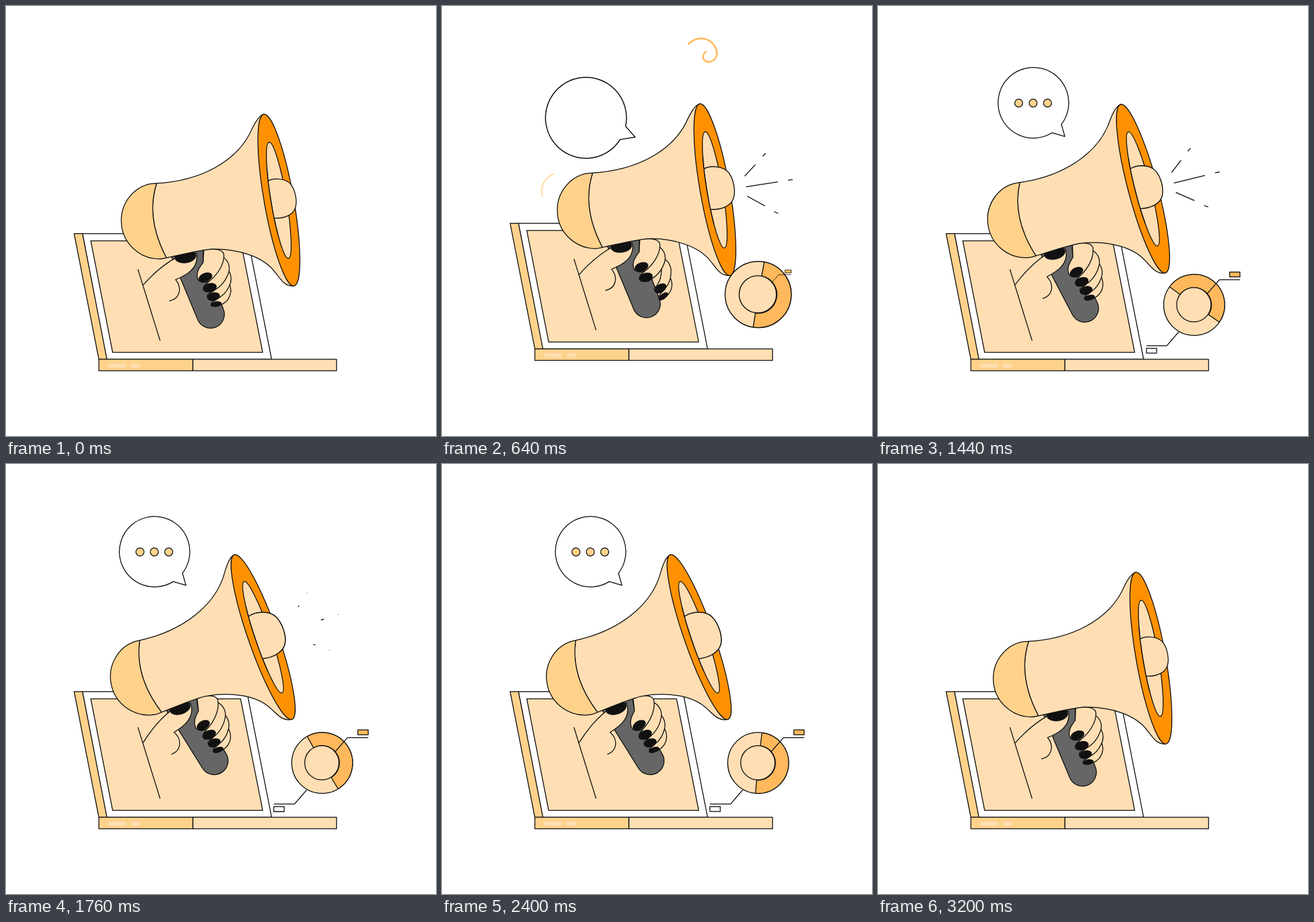
Recreate the animation shown at these times as an HTML page. Size 748 by 748 pixels, loop 3280 ms.

```html
<!DOCTYPE html>
<html lang="en">
<head>
<meta charset="utf-8">
<title>Megaphone</title>
<style>
  html, body { margin: 0; width: 100%; height: 100%; overflow: hidden; background: #fff; }
  svg { display: block; width: 100vw; height: 100vh; }
  .ink { stroke: #111; stroke-width: 1.5; stroke-linejoin: round; }
  .none { fill: none; }
  .white { fill: #fff; }
  .skin { fill: #ffdeb3; }
  .tan { fill: #ffd28c; }
  .amber { fill: #ffb85c; }
  .orange { fill: #ff9100; }
  .grey { fill: #666; }
  .nail { fill: #111; }
  .wave { fill: none; stroke: #ffd28c; stroke-linecap: round; }
</style>
</head>
<body>
<svg viewBox="0 0 748 748">
  <g id="scene">
    <g id="waves"></g>

    <g class="ink">
      <path class="white" d="M133,396H419L462,614.5H175Z"/>
      <path class="tan" d="M118.5,396H133L175.5,614.5H161.5Z"/>
      <path class="skin" d="M147.5,408.5H408L446.5,602.5H185.5Z"/>
      <path class="skin" d="M325,614.5H575V634.5H325Z"/>
      <path class="tan" d="M161.5,614.5H325V634.5H161.5Z"/>
      <path class="none" d="M229.5,458L268,582"/>
    </g>
    <rect class="skin" x="178" y="622" width="31" height="7" rx="3"/>
    <rect class="skin" x="217" y="622" width="16" height="7" rx="3"/>

    <g id="horn" class="ink">
      <path class="grey" d="M287,434L333.5,545.5A24,24 0 0 0 378,527L360,480L343,446V415Z"/>
      <path class="skin" d="M238,486C258,463 275,449 297,437L331,430C335,446 326,458 316,465C309,470 302,473 295,476C306,489 304,509 284,513"/>
      <ellipse class="nail" cx="312" cy="436" rx="18" ry="10.5" transform="rotate(-8 312 436)"/>

      <path class="skin" d="M262,308.5C340,304 399,270 424,222C430,209 439,190 449,188L500,487C484,488 477,474 468,463C448,436 403,422 360,423C338,424 312,431 279,438C259,400 247,355 262,308.5Z"/>
      <path class="tan" d="M262,308.5C226,309 200.5,340 200.5,373C200.5,411 231,440 267,440C271,440 275,439 279,438C259,400 247,355 262,308.5Z"/>
      <ellipse class="orange" rx="25.7" ry="151.7" transform="translate(474.7 337.7) rotate(-9.97)"/>
      <ellipse class="skin" rx="13.6" ry="102.4" transform="translate(474.5 338) rotate(-9.44)"/>
      <path id="dome" class="skin" d="M456.5,304C466,299 487,299 496,311C504,322 507,341 503,352C499,363 485,370 466.5,369"/>
      <ellipse class="none" rx="13.6" ry="102.4" transform="translate(474.5 338) rotate(-9.44)" pathLength="360" stroke-dasharray="100 360" stroke-dashoffset="-130"/>

      <g class="finger">
        <path class="skin" d="M388,482C393,492 392,504 384,513C379,518 372,522 362,522.5C356,522 356,517 360,514C370,510 378,500 382,492Z"/>
        <ellipse class="nail" rx="9" ry="4" transform="translate(365.5 518.5) rotate(-10)"/>
      </g>
      <g class="finger">
        <path class="skin" d="M386,459C393,468 393,479 388,488C383,499 374,508 360,512C351,512 348,505 352,501C364,496 372,484 376,474Z"/>
        <ellipse class="nail" rx="10.5" ry="6.5" transform="translate(361 505.5) rotate(-12)"/>
      </g>
      <g class="finger">
        <path class="skin" d="M378,437C388,444 391,456 386,467C381,480 372,490 358,497C347,499 343,492 345,487C354,478 364,470 366,455Z"/>
        <ellipse class="nail" rx="11.5" ry="7" transform="translate(354.5 490) rotate(-15)"/>
      </g>
      <g class="finger">
        <path class="skin" d="M344,425L343,446C336,455 331,463 333,473C335,482 349,483 357,476C372,462 380,446 379,432C377,425 370,423 360,423C354,423 349,424 344,425"/>
        <ellipse class="nail" rx="11.5" ry="7" transform="translate(347 472) rotate(-20)"/>
      </g>

      <g id="rays" class="none">
        <path d="M526.5,314L545,294"/><path d="M558,279.5L563,274.5"/>
        <path d="M529,332.5L584,324"/><path d="M602,321L610,320"/>
        <path d="M531,349L562,366"/><path d="M578,376L585,379"/>
      </g>
    </g>

    <g transform="translate(550 520)" class="ink">
      <g id="donut">
        <circle class="skin" r="53"/>
        <path id="slice" class="amber"/>
        <circle class="skin" cx="-.6" cy="-.3" r="29.8"/>
      </g>
      <g id="noteA">
        <path class="none" d="M23,-20L44,-44H80"/>
        <rect class="amber" x="62" y="-57.5" width="18" height="8.5"/>
      </g>
      <g id="noteB">
        <path class="none" d="M-27,47L-48,71.5H-84"/>
        <rect class="white" x="-84" y="76" width="18" height="8.5"/>
      </g>
    </g>

    <path id="curl" fill="none" stroke="#ffb85c" stroke-width="3" stroke-linecap="round"
      d="M429,84C440,73 455,72 466,79C477,87 481,101 476,108C471,117 459,118 455,110C451,101 462,92 476,95"/>
  </g>

  <g id="bubble" class="ink">
    <path class="white" d="M49,37L55,58L33,51.5A61.3,61.3 0 1 1 49,37Z"/>
    <g id="dots"></g>
  </g>
</svg>

<script>
const LOOP = 3280, STEP = 40;
const $ = id => document.getElementById(id);
const set = (el, attrs) => { for (const k in attrs) el.setAttribute(k, attrs[k]); return el; };
const add = (parent, tag, attrs) =>
  parent.appendChild(set(document.createElementNS('http://www.w3.org/2000/svg', tag), attrs));
const show = (el, on) => { el.style.display = on ? '' : 'none'; };

// Timing: progress, eased rise, rise and fall, fade in and out, springy pop.
const part = (t, a, b) => Math.min(1, Math.max(0, (t - a) / (b - a)));
const ramp = (t, a, b) => (1 - Math.cos(Math.PI * part(t, a, b))) / 2;
const hump = (t, a, b) => Math.sin(Math.PI * part(t, a, b)) ** 2;
const stay = (t, a, b) => ramp(t, a, a + 80) - ramp(t, b - 80, b);
const spring = (t, a) => {
  const s = Math.max(0, t - a) / 1000;
  return 1 - Math.exp(-5 * s) * Math.cos(8 * s);
};

// Shows only the part of a path from a to b (0..1).
function trim(el, a, b) {
  show(el, b - a > 0.002);
  set(el, { pathLength: 1, 'stroke-dasharray': `${Math.max(0, b - a)} 3`, 'stroke-dashoffset': -a });
}

function scaleAt(el, x, y, s) {
  show(el, s > 0.005);
  set(el, { transform: `translate(${x} ${y}) scale(${s}) translate(${-x} ${-y})` });
}

const polar = (r, deg) => {
  const a = deg * Math.PI / 180;
  return `${r * Math.cos(a)},${r * Math.sin(a)}`;
};

const fingers = [...document.querySelectorAll('.finger')];
const knuckles = ['385 480', '380 460', '377 439', '364 428'];
const opening = [-27, -23, -9, -23];
const rays = [...$('rays').children];
const waves = [0, 1, 2].map(() => add($('waves'), 'path', { class: 'wave', transform: 'translate(205 340)' }));
const dots = [-25, 0, 25].map(cx => add($('dots'), 'circle', { cx, class: 'tan' }));

function drawHorn(t) {
  const tilt = -9.35 * (ramp(t, 1140, 1720) - ramp(t, 2820, 3180));
  set($('horn'), { transform: `rotate(${tilt} 237 487)` });

  const swell = (ramp(t, 300, 560) + ramp(t, 1440, 1720)) / 2 - ramp(t, 2840, 3160);
  scaleAt($('dome'), 461, 337, 1 + 0.18 * swell);

  // The lower pair of fingers taps first, the upper pair later.
  fingers.forEach((finger, i) => {
    const lift = i < 2 ? hump(t, 440, 860) : hump(t, 1860, 2300);
    set(finger, { transform: `rotate(${opening[i] * lift} ${knuckles[i]})` });
  });
  for (const ray of rays) trim(ray, ramp(t, 1600, 1800), ramp(t, 360, 560));
}

function drawWaves(t) {
  const first = t < 1400;
  const grow = first ? 1.04 * ramp(t, 600, 1100) : 1;
  scaleAt($('waves'), 272, 373, first ? 1 : 0.52 + 0.5 * ramp(t, 1920, 2320));
  set($('waves'), { opacity: stay(t, 560, 1180) + stay(t, 1920, 2380) });
  waves.forEach((wave, i) => {
    const r = 31 + (15 + 21.5 * i) * grow;
    set(wave, { d: `M${polar(r, 163)}A${r},${r} 0 0 1 ${polar(r, 251)}`, 'stroke-width': 1 + grow });
  });
}

function drawDonut(t, left) {
  // Half the ring sways to and fro twice.
  const a = 85 * Math.sin(Math.PI * 2 * part(t, 180, 2840)) ** 2 - 146;
  const b = a + 178;
  set($('slice'), {
    d: `M${polar(53, a)}A53,53 0 0 1 ${polar(53, b)}L${polar(30, b)}A30,30 0 0 0 ${polar(30, a)}Z`
  });
  scaleAt($('donut'), 0, 0, spring(t, 180) * left);
  scaleAt($('noteA'), 23, -20, spring(t, 535) * left);
  scaleAt($('noteB'), -27, 47, spring(t, 640) * left);
}

function drawCurl(t) {
  const late = t > 1600;
  trim($('curl'),
    late ? ramp(t, 2840, 3140) : ramp(t, 680, 960),
    late ? ramp(t, 2400, 2760) : ramp(t, 320, 740));
  set($('curl'), { transform: `translate(0 ${-9 * ramp(t, 2820, 3140)})` });
}

function drawBubble(t, left) {
  const swing = 1 - ramp(t, 300, 1000), move = ramp(t, 1460, 1700);
  const x = 325 + 21 * swing - 12 * move;
  const y = 227 + 2 * swing - 16 * move;
  const size = spring(t, 260) * left;
  show($('bubble'), size > 0.005);
  set($('bubble'), {
    transform: `translate(${x} ${y}) rotate(${-49 * swing}) scale(${size}) translate(-55 -58)`
  });
  dots.forEach((dot, i) => set(dot, { r: 7 * spring(t, 700 + 60 * i) }));
  dots.forEach((dot, i) => show(dot, t > 700 + 60 * i));
}

function draw(t) {
  const left = 1 - ramp(t, 2860, 3140);
  set($('scene'), { transform: `translate(0 ${-20.8 * hump(t, 60, 1000)})` });
  drawHorn(t);
  drawWaves(t);
  drawDonut(t, left);
  drawCurl(t);
  drawBubble(t, left);
}

const start = performance.now();
function tick() {
  const t = (performance.now() - start) % LOOP;
  draw(Math.floor(t / STEP) * STEP);
  requestAnimationFrame(tick);
}
tick();
</script>
</body>
</html>
```
